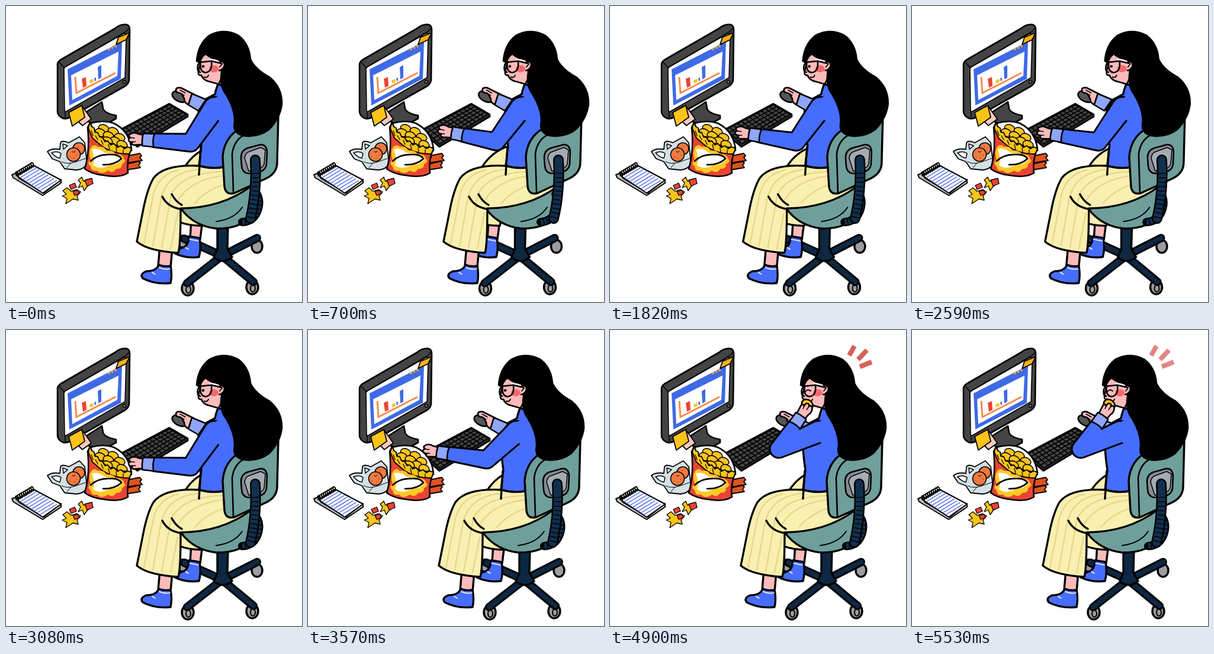
Recreate the animation shown at these times as an HTML page. Size 500 by 500 pixels, loop 5.6 s.

```html
<!DOCTYPE html>
<html lang="en">
<head>
<meta charset="utf-8">
<title>Desk snack</title>
<style>
html,body{margin:0;width:100%;height:100%;overflow:hidden;background:#fff}
svg{display:block;width:100%;height:100%}
.k{stroke:#000;stroke-width:2.6;stroke-linejoin:round;stroke-linecap:round}
.b{stroke-width:3.4}
.n{fill:none}
.skin{fill:#fcbbbb}.blue{fill:#476dfc}.pale{fill:#8fa6fb}.teal{fill:#6f9f9b}
.dark{fill:#444}.gold{fill:#fcc419}.red{fill:#ea4434}.wheel{fill:#9b9da0}.cream{fill:#f8efb0}
</style>
</head>
<body>
<svg viewBox="0 0 500 500">
<g class="k">
  <!-- keyboard -->
  <path d="M193 209L276 165L307 183V187L222 238L193 213Z" fill="#222"/>
  <path id="keys" class="dark" stroke-width="1.5"/>
  <!-- monitor -->
  <path class="dark" d="M134 180L162 162L164 173Q166 181 186 185V190L163 203L140 196Z"/>
  <path class="dark" d="M87 101Q86 95 92 91L184 38Q192 31 202 31Q209 32 209 40L208 125Q207 132 200 136L108 188Q99 193 93 188Q87 184 87 178Z"/>
  <path class="n" stroke-width="1.5" d="M90 95L98 104L100 190M98 104L203 43L208 37"/>
  <path fill="#fff" stroke-width="1.5" d="M98 107Q98 104 102 102L198 47Q203 45 203 50L201 121L102 178Q99 179 99 175Z"/>
  <circle cx="200" cy="128" r="2.6" fill="#777" stroke-width="1.5"/>
</g>
<path d="M104 107L196 60L194 123L107 168Z" fill="#3f6ae6"/>
<path d="M110 117L190 77L188 118L112 159Z" fill="#fff"/>
<path d="M117 120L119 147L185 113" fill="none" stroke="#f58a4b" stroke-width="3"/>
<path d="M128 123L135 120L136 135L130 138Z" fill="#ea4434"/>
<path d="M141 126L147 123L148 128L142 131Z" fill="#fcc419"/>
<path d="M155 103L161 100V121L156 124ZM149 122L152 121V126L150 127Z" fill="#3f6ae6"/>
<g fill="#f9a030"><circle cx="174" cy="73" r="2"/><circle cx="179.500" cy="70.500" r="2"/><circle cx="185" cy="68" r="2"/></g>
<g class="k">
  <path fill="#fbb016" stroke-width="1.8" d="M190 53L209 45L203 57L186 65Z"/>
  <path fill="#f8c9bd" stroke-width="1.8" d="M128 169L135 178L144 191L129 202L121 194Z"/>
  <path fill="#fcc419" stroke-width="1.8" d="M106 180L128 168L133 188L112 203Z"/>
  <!-- notepad -->
  <path fill="#bbb" stroke-width="2" d="M10 285L18 282L22 291L64 316L93 293V299L62 320L12 290Z"/>
  <path fill="#fff" stroke-width="2" d="M17 286L46 269L93 294L62 316Z"/>
  <path id="rings" class="n" stroke-width="2"/>
  <path id="rules" class="n" style="stroke:#5877e8;stroke-width:1.5"/>
  <!-- oranges -->
  <path fill="#d3e1e6" stroke-width="1.8" d="M70 246Q76 240 91 242L92 231Q95 226 106 231L124 221L133 231L137 266Q132 276 119 277L99 275L91 263L78 258Z"/>
  <path fill="#fff" stroke-width="1.5" d="M77 248Q86 244 93 249L91 257Q84 256 77 248ZM96 233L104 236L97 242Z"/>
  <g fill="#f17a40" stroke-width="1.6"><circle cx="123" cy="241" r="10"/><circle cx="114" cy="251" r="11.500"/></g>
  <path class="n" stroke-width="1" d="M112 246l3 1l2 -2M122 238h.1M108 255h.1M115 257h.1M120 252h.1M94 263Q103 268 116 264L136 257M103 273L110 265"/>
  <!-- sticks -->
  <path fill="#e0531f" stroke-width="1.8" d="M201 254L226 249L229 253L226 256L230 261L203 267ZM201 266L223 262L227 265L224 269L227 273L203 277Z"/>
  <!-- crisps -->
  <path fill="#fff" d="M143 198Q165 192 182 198Q210 212 212 244L185 250L146 222Z"/>
  <g class="gold" stroke-width="1.6" id="chips"></g>
  <path class="red" d="M142 197L148 211L158 221L172 231L190 238L212 240Q203 262 206 282Q192 291 165 286Q145 284 133 275Q142 245 138 205Z"/>
  <path class="gold" stroke-width="1.8" d="M142 197L145 204L149 206L150 213L155 214L158 221L163 222L167 229L172 228L177 235L182 232L188 239L194 236L200 241L206 238L212 241L208 250Q180 250 161 236L146 223L139 206Z"/>
  <path class="n" stroke-width="1.300" d="M144 211l3 8M151 219l4 7M161 227l3 7M173 234l2 8M186 240l1 7M198 243v6"/>
</g>
<path fill="#ffc928" d="M144 238Q150 232 155 238Q166 236 169 244Q182 243 185 250Q198 250 199 258Q205 262 196 267Q196 276 186 275Q181 284 172 278Q161 286 154 278Q144 280 143 271Q136 266 143 259Q138 248 144 238Z"/>
<path fill="#fff" d="M145 242Q158 239 166 248Q183 248 197 258Q190 269 175 268Q160 278 147 269Q151 257 145 242Z"/>
<path class="k n" stroke-width="1.7" d="M143 262Q155 250 176 251Q190 250 195 258Q183 269 164 268"/>
<g class="k" style="stroke-width:1.3">
  <path class="gold" d="M96 312L103 307L110 313L119 310L126 314L120 321L122 328L113 326L101 334L103 325L95 321L102 318ZM122 294L128 289L131 296L142 293L146 299L137 305L132 312L129 304L122 307L126 299Z"/>
  <path class="red" d="M107 303L116 299L119 306L110 310ZM133 294L145 291L147 300L137 304ZM113 313L121 311L124 317L116 320Z"/>
</g>

<!-- chair foot -->
<g id="base" class="k b">
  <g class="wheel"><ellipse cx="298" cy="398" rx="8" ry="10"/><ellipse id="side" cx="424" cy="406" rx="9" ry="11"/>
  <ellipse cx="307" cy="477" rx="10" ry="12"/><ellipse cx="416" cy="475" rx="10" ry="12"/></g>
  <g id="legs" class="n"></g>
  <path d="M357 370H375L374 410L382 424Q368 437 351 425L357 410Z" fill="#0e2843"/>
  <g class="n" stroke-width="2"><ellipse cx="308" cy="479" rx="4" ry="6"/><ellipse cx="417" cy="477" rx="4" ry="6"/></g>
</g>
<!-- far leg -->
<g id="far" class="k b">
  <path class="cream" d="M348 236Q318 246 302 272V292H348Z"/>
  <path class="skin" d="M313 360L332 362L328 394L311 393Z"/>
  <path class="blue" d="M309 389L327 392Q330 410 326 424Q305 427 285 418Q289 410 302 407Q309 401 309 389Z"/>
  <path class="n" d="M310 394L325 397M303 408l5 3" style="stroke:#fff;stroke-width:1.6"/>
  <path class="cream" d="M290 338H340L332 371Q312 372 290 364Z"/>
</g>
<g id="seat" class="k b">
  <path class="teal" d="M296 343Q350 325 413 303L416 350Q402 376 356 376Q318 372 296 343Z"/>
  <path class="n" stroke-width="2" d="M355 364Q386 360 399 340"/>
</g>

<g class="k b sway">
  <path class="blue" d="M358 132Q354 143 353 149L336 158L325 176Q326 212 330 236L326 270Q348 276 368 272L390 215Q392 170 373 136Z"/>
  <path class="skin" d="M260 405L281 408L278 442L257 439Z"/>
  <path class="blue" d="M258 437Q267 441 278 439Q281 454 278 468Q252 471 231 460Q225 453 237 448Q254 448 258 437Z"/>
  <path class="n" d="M259 442Q268 446 277 444M247 450l5 3" style="stroke:#fff;stroke-width:1.6"/>
  <path class="cream" d="M326 270Q267 267 249 291Q238 310 231 348L221 398Q240 414 291 417Q295 405 295 342Q365 341 413 305L402 280L368 272Q348 276 326 270Z"/>
  <g class="n" style="stroke:#e6d384;stroke-width:2">
    <path d="M292 277Q258 284 249 318L233 401"/><path d="M326 276Q272 281 262 325L248 405"/>
    <path d="M365 280Q299 281 279 318L263 408"/><path d="M390 285Q315 287 291 328M290 350L278 410M397 295Q345 302 319 333"/>
  </g>
  <path class="n" d="M264 322Q273 340 296 343M329 238L326 285M280 318Q287 331 297 336"/>
</g>

<!-- mouse hand -->
<g id="mouse" class="k">
  <ellipse cx="294" cy="153" rx="14" ry="8.500" transform="rotate(24 294 153)" fill="#555"/>
  <path class="skin" d="M287 142Q287 137 295 138L305 143L317 149L310 167Q301 165 301 156L297 149L294 147Q287 147 287 142Z"/>
  <path class="n" stroke-width="1.500" d="M294 142l9 5M294 147l7 4"/>
  <path class="pale" d="M314 148L338 158L325 177L308 167Z"/>
</g>

<g id="lever" class="k n">
  <path d="M424 318Q431 331 424 348Q417 364 399 365" stroke-width="14"/>
  <path d="M424 318Q431 331 424 348Q417 364 399 365" style="stroke:#12304e;stroke-width:9;stroke-dasharray:5 1.5;stroke-linecap:butt"/>
</g>
<g id="back" class="k b">
  <path class="teal" d="M390 210Q368 226 366 255L369 305Q371 320 386 316L440 291Q458 282 458 264L460 185Z"/>
  <path class="n" stroke-width="2.600" d="M404 217Q385 226 382 250L384 314"/>
  <path fill="#858c93" stroke-width="2.600" d="M397 256Q397 244 408 240L430 234Q440 234 441 246L440 268Q438 278 428 280L410 283Q399 282 398 270Z"/>
  <path fill="#a4abb1" stroke-width="1.500" d="M403 257Q404 248 411 246L430 239L438 243L436 267Q433 274 425 276L410 279Z"/>
  <path class="n" style="stroke-width:18" d="M421 260Q424 312 413 359"/>
  <path class="n" style="stroke:#12304e;stroke-width:13" d="M421 260Q424 312 413 359"/>
  <path class="n" style="stroke-width:13;stroke-dasharray:1.5 6;stroke-linecap:butt" d="M422 282Q424 315 413 361"/>
</g>

<g class="k sway">
  <path class="skin" d="M337 72Q326 82 328 97L325 111Q324 118 330 117Q333 126 345 128L359 132L370 110L364 84Z"/>
  <ellipse cx="351" cy="106" rx="8" ry="6" fill="#f8676c" stroke="none"/>
  <path d="M322 93Q324 65 343 50Q368 36 393 50Q411 64 413 90Q421 107 445 120Q467 138 466 166Q463 190 444 209Q425 223 400 219Q382 214 386 196Q387 175 372 150Q360 135 364 112L362 92Q348 90 337 81Q330 86 327 96Z"/>
  <path class="skin" stroke-width="2.400" d="M358 96Q366 91 369 98Q369 107 360 109"/>
  <path class="n" stroke-width="1.800" d="M361 103l4-5"/>
  <path d="M345 91.500Q352 91 358 94" class="n" style="stroke:#fff;stroke-width:4"/>
  <path class="n" d="M328 95L347 93L364 97M328 95Q322 99 324 109L328 112"/>
  <path class="n" d="M329 94Q326 111 337 112.500Q349 111 347 93"/>
  <circle id="open" cx="333" cy="102" r="2.300" stroke="none"/>
  <path id="shut" class="n" stroke-width="2" d="M330 104Q334 99 339 103"/>
  <path class="n" stroke-width="2" d="M335 120Q340 122 342 117"/>
</g>

<!-- near arm -->
<g class="k"><path id="armLine" style="stroke-width:6"/></g>
<path id="armFill" class="blue"/>
<path class="blue sway" d="M345 170Q349 153 366 150L379 178L369 198Q350 192 345 170Z"/>
<g id="hand" class="k">
  <ellipse id="crisp" class="gold" cx="41" cy="-2" rx="8" ry="10"/>
  <path class="skin" d="M17 8L27 9Q36 13 42 7Q44 4 40 2Q45 0 42 -4Q40 -6 36 -5Q39 -10 33 -10L17 -8Z"/>
  <path class="n" stroke-width="1.500" d="M40 2L33 2M36 -5L31 -4"/>
  <path class="pale" d="M0 -11L19 -10.500Q21 0 19 10.500L0 11Q3 0 0 -11Z"/>
</g>
<path id="joy" d="M413 27L404 43M434 34L419 50M442 54L422 62" fill="none" stroke="#d2453f" stroke-width="8"/>
</svg>
<script>
const $ = id => document.getElementById(id);
const set = (id, name, v) => $(id).setAttribute(name, v);
const mix = (a, b, u) => a + (b - a) * u;
const LOOP = 5600, STEP = 70, CYCLE = 1470;

function drawStill() {
  const at = (u, v) => [mix(mix(196, 276, u), mix(223, 304, u), v), mix(mix(209, 167, u), mix(233, 183, u), v)].map(n => n.toFixed(1));
  let d = '';
  for (let r = 0; r < 5; r++) for (let c = 0; c < 12; c++) {
    const u = c / 12, v = r / 5, w = u + .082, h = v + .19;
    d += `M${at(u, v)}L${at(w, v)}L${at(w, h)}L${at(u, h)}Z`;
  }
  set('keys', 'd', d);
  let rings = '', rules = '';
  for (let i = 0; i < 9; i++) rings += `M${19 + i * 3.2} ${287 - i * 1.9}q-5 -6 -1 -7q3 0 3 7`;
  for (let i = 1; i < 9; i++) rules += `M${19 + i * 4.8} ${287 + i * 3.1}l28 -17`;
  set('rings', 'd', rings);
  set('rules', 'd', rules);
  const chips = [[165, 207], [181, 212], [192, 222], [159, 214], [173, 219], [184, 228], [196, 234], [171, 228]];
  $('chips').innerHTML = chips.map(([x, y]) => `<ellipse cx="${x}" cy="${y}" rx="9" ry="6.500" transform="rotate(20 ${x} ${y})"/>`).join('');
  const legs = 'M365 422L301 393M365 422L424 392M365 422L306 468M365 422L418 466';
  $('legs').innerHTML = `<path d="${legs}" style="stroke-width:14"/><path d="${legs}" style="stroke:#0e2843;stroke-width:8"/>`;
}

// time, elbow x y, wrist x y
const reach = [
  [3150, 312, 231, 250, 227], [3570, 302, 219, 237, 209], [3710, 301, 221, 231, 213],
  [3850, 301, 220, 233, 211], [4060, 291, 212, 262, 168], [4270, 285, 201, 312, 161]
];

function armPose(t, s) {
  if (t < 2940) {
    const lift = 1 - (1 - s) ** 3;
    return [312 + 6 * s, 231 - 2 * lift, 250 + 12 * s ** 1.4, 227 - 9 * lift];
  }
  const i = reach.findIndex(k => k[0] > t);
  if (i === 0) return reach[0].slice(1);
  if (i < 0) return reach[reach.length - 1].slice(1);
  const a = reach[i - 1], b = reach[i];
  let u = (t - a[0]) / (b[0] - a[0]);
  u = u * u * (3 - 2 * u);
  return a.slice(1).map((v, j) => mix(v, b[j + 1], u));
}

function limb(x1, y1, r1, x2, y2, r2) {
  const a = Math.atan2(y2 - y1, x2 - x1), o = Math.acos((r1 - r2) / Math.hypot(x2 - x1, y2 - y1));
  const p = (x, y, r, k) => `${x + r * Math.cos(a + k * o)} ${y + r * Math.sin(a + k * o)}`;
  return `M${p(x1, y1, r1, 1)}A${r1} ${r1} 0 1 1 ${p(x1, y1, r1, -1)}L${p(x2, y2, r2, -1)}A${r2} ${r2} 0 0 1 ${p(x2, y2, r2, 1)}Z`;
}

function draw(t) {
  const turn = 2 * Math.PI * t / CYCLE, moving = t < 2 * CYCLE;
  const s = moving ? (1 - Math.cos(turn)) / 2 : 0;
  const shift = x => `translate(${x} 0)`;
  document.querySelectorAll('.sway').forEach(g => g.setAttribute('transform', shift(8 * s)));
  set('base', 'transform', shift(-7.5 * s));
  set('side', 'transform', shift(3 * s));
  set('far', 'transform', shift(-8 * s));
  set('seat', 'transform', shift(5 * s));
  set('back', 'transform', shift(2 * s));
  set('lever', 'transform', shift(-6 * s));
  set('mouse', 'transform', shift(7 * s + (moving ? 3.5 * Math.sin(turn) : 0)));

  const [ex, ey, wx, wy] = armPose(t, s);
  const d = limb(352 + 8 * s, 172, 17, ex, ey, 13.5) + limb(ex, ey, 13.5, wx, wy, 10);
  set('armLine', 'd', d);
  set('armFill', 'd', d);
  const deg = Math.atan2(wy - ey, wx - ex) * 180 / Math.PI;
  set('hand', 'transform', `translate(${wx} ${wy}) rotate(${deg})`);
  set('crisp', 'opacity', t >= 3780 ? 1 : 0);

  const glad = t >= 4480;
  set('open', 'opacity', glad ? 0 : 1);
  set('shut', 'opacity', glad ? 1 : 0);
  const beat = (t - 4480) % 560 / 560;
  set('joy', 'opacity', glad ? Math.sin(Math.PI * beat) ** .45 : 0);
}

drawStill();
const start = performance.now();
function tick() {
  const t = (performance.now() - start) % LOOP;
  draw(Math.floor(t / STEP) * STEP);
  requestAnimationFrame(tick);
}
tick();
</script>
</body>
</html>
```
